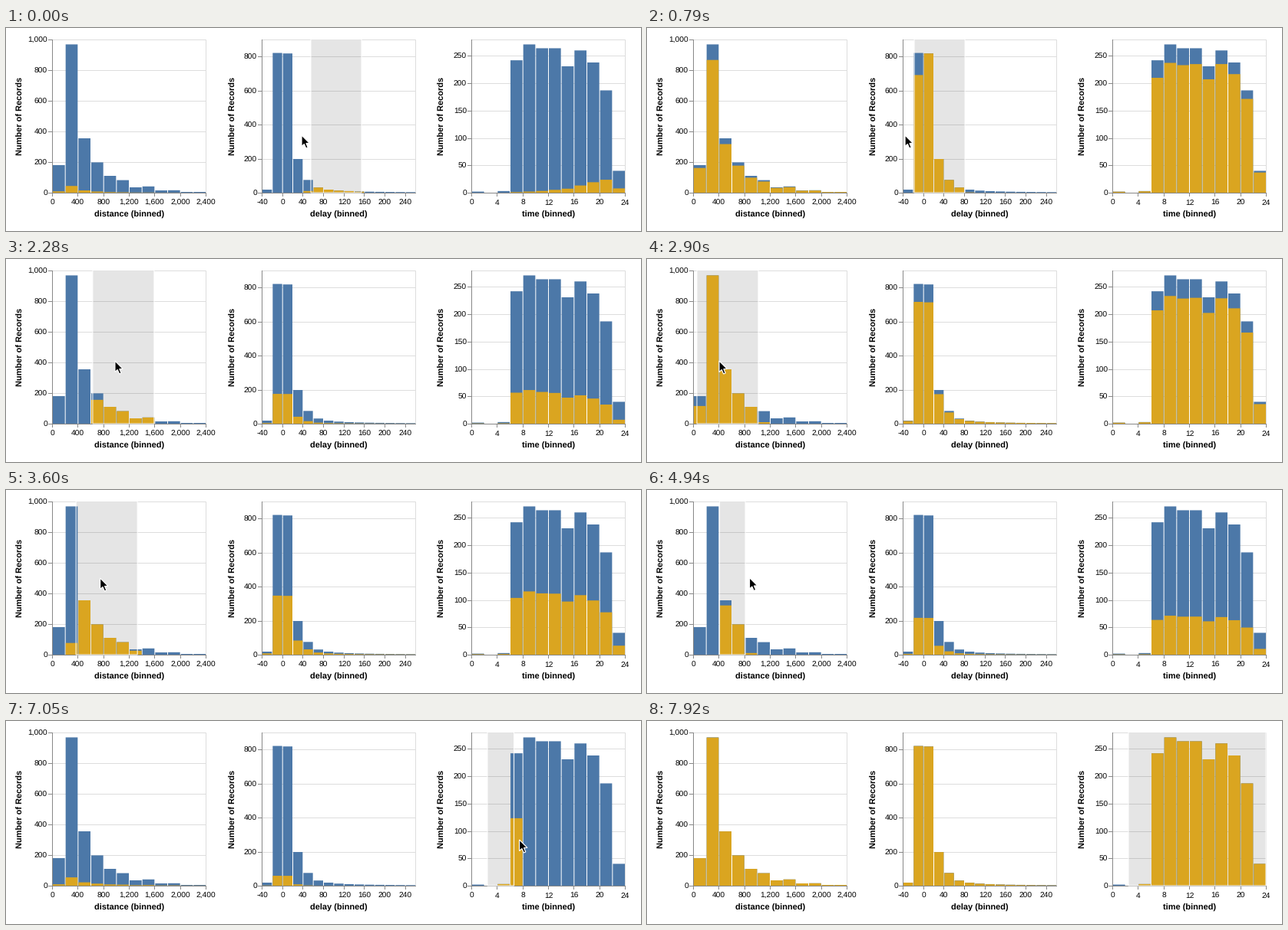
Write a matplotlib script that moves like this. It is 827x265 px and loops after 8000 ms.

```python
from collections import namedtuple
import numpy as np
import matplotlib.pyplot as plt
from matplotlib.animation import FuncAnimation
from matplotlib.patches import Polygon, Rectangle

plt.rcParams["font.family"] = "Liberation Sans"
plt.rcParams["text.hinting"] = "none"

W, H, DPI = 827, 265, 64
PT = 72 / DPI                      # points per pixel
FRAMES, STEP = 100, 80
TOP, BOTTOM, SIZE = 15, 215, 200
BLUE, GOLD, GRID, AXIS = "#4c78a8", "#daa520", "#dddddd", "#888888"
LINK = 0.12                        # strength of the tie between variables


def smooth(u):
    return u * u * (3 - 2 * u)


def ease_out(u):
    return 1 - (1 - u) ** 3


def ease_in(u):
    return u * u


class Chart:
    def __init__(self, name, x, lo, hi, xstep, ymax, ystep, label_x, skew, totals, score):
        self.name, self.x, self.lo, self.hi = name, x, lo, hi
        self.xstep, self.ymax, self.ystep = xstep, ymax, ystep
        self.label_x, self.skew = label_x, skew
        self.totals = np.array(totals, float)
        self.n = len(totals)
        self.bin = SIZE / self.n
        self.score = score(np.arange(self.n))

    def picked(self, left, right):
        """Records per bin that lie between two pixel positions."""
        def below(px):
            u = np.clip((px - self.x) / self.bin - np.arange(self.n), 0, 1)
            return 1 - (1 - u) ** self.skew
        return self.totals * (below(right) - below(left))

    def share(self, part, score):
        """Records per bin kept when another chart selects a part of all."""
        tilt = np.exp(LINK * score * self.score)
        tilt /= np.average(tilt, weights=self.totals)
        return self.totals * (1 - (1 - part) ** tilt)


delay_tail = [75 * k ** -1.3 for k in range(1, 12)]
CHARTS = [
    Chart("distance", 60, 0, 2400, 400, 1000, 200, 22, 1.25,
          [180, 968, 355, 198, 110, 82, 35, 41, 15, 16, 5, 5],
          lambda j: 0.17 * (2.5 - j)),
    Chart("delay", 333, -40, 260, 40, 900, 200, 299, 1.25,
          [18, 821, 818, 198] + delay_tail,
          lambda j: np.maximum(j - 2, 0)),
    Chart("time", 606, 0, 24, 4, 280, 50, 571, 1.75,
          [2, 0, 3, 242, 271, 264, 264, 231, 260, 238, 187, 40],
          lambda j: j - 8),
]

# Each drag moves the brush edges; the pointer sits at `lead` from the moving one
Drag = namedtuple("Drag", "start end chart left right lead y ease")
DRAGS = [
    Drag(0, 800, 1, (397, 348), (463, 414), -12, 140, ease_out),
    Drag(960, 1450, 0, (217, 137), (217, 217), -13, 128, smooth),
    Drag(1790, 2960, 0, (137, 64), (217, 144), 29, 133, smooth),
    Drag(3120, 3920, 0, (64, 93), (144, 173), 31.5, 115, ease_out),
    Drag(4640, 6170, 0, (94.6, 94.6), (94.6, 178), 5.5, 114.5, ease_out),
    Drag(6350, 7920, 2, (627, 627), (627, 806), 7, 155, ease_in),
]
POINTER_LIMIT = 800
ARROW = np.array([(0, 0), (0, 14.6), (3.3, 11.5), (5.7, 17), (8.2, 15.9),
                  (5.9, 10.5), (10.4, 10.5)])


def mix(a, b, u):
    return a + (b - a) * u


def edges(drag, t):
    u = np.clip((t - drag.start) / (drag.end - drag.start), 0, 1)
    return mix(*drag.left, drag.ease(u)), mix(*drag.right, drag.ease(u))


def grip(drag, t):
    left, right = edges(drag, t)
    moving = right if drag.left[0] == drag.left[1] else left
    return np.array([moving + drag.lead, drag.y])


def state(t):
    """Current drag and pointer place; the pointer glides between drags."""
    k = max(i for i, d in enumerate(DRAGS) if d.start <= t)
    drag, spot = DRAGS[k], grip(DRAGS[k], t)
    if t > drag.end and k + 1 < len(DRAGS):
        nxt = DRAGS[k + 1]
        u = smooth((t - drag.end) / (nxt.start - drag.end))
        spot = mix(spot, grip(nxt, nxt.start), u)
    return drag, spot


fig = plt.figure(figsize=(W / DPI, H / DPI), dpi=DPI, facecolor="white")
ax = fig.add_axes([0, 0, 1, 1])
ax.set_xlim(0, W)
ax.set_ylim(H, 0)
ax.axis("off")


def line(x0, y0, x1, y1, color, z):
    ax.plot([x0, x1], [y0, y1], color=color, lw=PT, zorder=z,
            solid_capstyle="butt", snap=False)


def rect(x, y, w, h, z, **style):
    return ax.add_patch(Rectangle((x, y), w, h, zorder=z, snap=False, **style))


def label(x, y, s, size=10.3, **style):
    ax.text(x, y, s, fontsize=size * PT, color="black", va="baseline", zorder=2, **style)


def bars(chart, color, z):
    return [rect(chart.x + i * chart.bin + 1, BOTTOM, chart.bin - 1, 0, z,
                 facecolor=color, lw=0) for i in range(chart.n)]


def set_bars(patches, chart, counts):
    for p, c in zip(patches, counts):
        p.set_height(-c / chart.ymax * SIZE)


def draw_chart(c):
    rect(c.x + .5, TOP + .5, SIZE, SIZE, 0, fill=False, ec=GRID, lw=PT)
    for v in range(0, c.ymax + 1, c.ystep):
        y = round(BOTTOM - v / c.ymax * SIZE) + .5
        line(c.x, y, c.x + SIZE, y, GRID, 0)
        line(c.x - 5, y, c.x, y, AXIS, 2)
        label(c.x - 6, y + 3.4, f"{v:,}", ha="right")
    for v in range(c.lo, c.hi + 1, c.xstep):
        x = round(c.x + (v - c.lo) / (c.hi - c.lo) * SIZE) + .5
        line(x, BOTTOM, x, BOTTOM + 5, AXIS, 2)
        label(x, 230.8, f"{v:,}", ha="center")
    line(c.x + .5, TOP, c.x + .5, BOTTOM + 1, AXIS, 2)
    line(c.x, BOTTOM + .5, c.x + SIZE + 1, BOTTOM + .5, AXIS, 2)
    mid = c.x + SIZE / 2 + .5
    label(mid, 246.6, f"{c.name} (binned)", 11, weight="bold", ha="center")
    label(c.label_x, TOP + SIZE / 2, "Number of Records", 11, weight="bold",
          ha="center", rotation=90, rotation_mode="anchor")
    set_bars(bars(c, BLUE, 4), c, c.totals)
    return bars(c, GOLD, 5)


gold = [draw_chart(c) for c in CHARTS]
shade = rect(0, TOP, 1, SIZE, 3, facecolor="#333333", alpha=.125, lw=0)
edge = rect(0, TOP, 1, SIZE, 6, fill=False, ec="white", lw=PT)
arrow = ax.add_patch(Polygon(ARROW, closed=True, fc="black", ec="white",
                             lw=1.2 * PT, joinstyle="miter", zorder=9))


def draw(i):
    t = i * STEP
    drag, spot = state(t)
    left, right = edges(drag, t)
    brushed = CHARTS[drag.chart]
    own = brushed.picked(left, right)
    part = own.sum() / brushed.totals.sum()
    score = own @ brushed.score / max(own.sum(), 1)
    for patches, chart in zip(gold, CHARTS):
        set_bars(patches, chart, own if chart is brushed else chart.share(part, score))
    for r in (shade, edge):
        r.set_x(left)
        r.set_width(right - left)
    arrow.set_xy(ARROW + spot)
    arrow.set_visible(spot[0] < POINTER_LIMIT)
    return []


anim = FuncAnimation(fig, draw, frames=FRAMES, interval=STEP, repeat=True,
                     init_func=lambda: draw(0))
plt.show()
```
